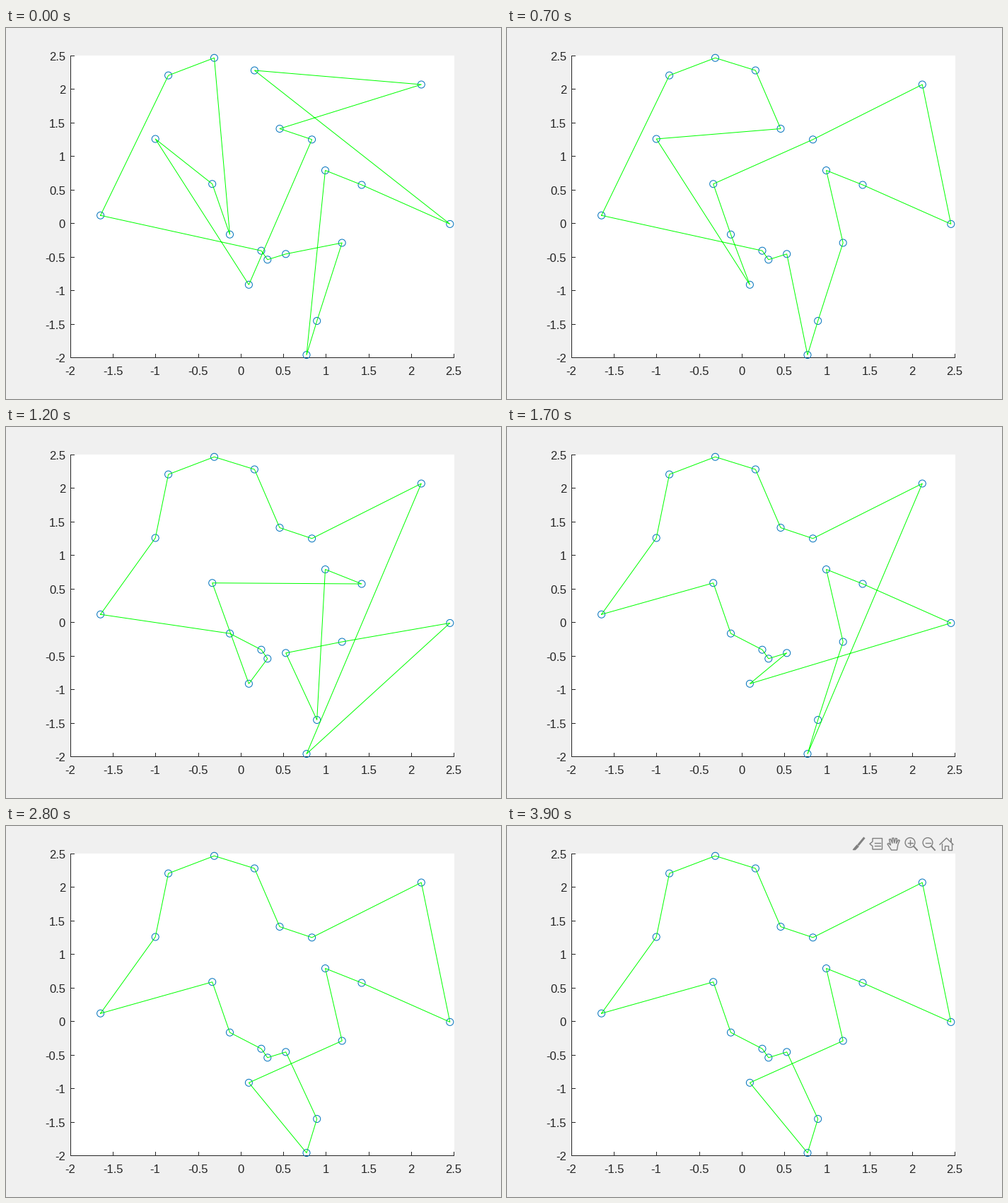
Animation of 700 by 525 pixels, one loop 4 s. Source, as a matplotlib script:

```python
from math import cos, floor, radians, sin

import matplotlib.pyplot as plt
from matplotlib.animation import FuncAnimation
from matplotlib.patches import Circle, Polygon, Rectangle

W, H, DPI = 700, 525, 100
STEP_MS, STEPS = 100, 40
PX = 72 / DPI                       # one pixel in points
INK, ICON = "#262626", "#808080"
LEFT, RIGHT, TOP, BOTTOM = 91.5, 633.5, 39.5, 466.5

# Cities A to T in stage pixels
CITIES = dict(zip("ABCDEFGHIJKLMNOPQRST", [
    (133.6, 265.2), (229.6, 67.1), (294.5, 42.3), (351.4, 60), (387, 142.5),
    (432.6, 157.8), (587.3, 80), (627.8, 277.4), (503, 222), (451.5, 201.5),
    (475.2, 304), (439.7, 414.5), (425, 462.6), (395.7, 319.8), (369.8, 327.8),
    (361, 315.2), (316.5, 292.2), (343.4, 363.3), (291.7, 220.7), (211.2, 157),
]))

# Tours reached at a time in ms, and the times of single-city moves between
CROSSED, SOLVED = "ATBCDEFGHKMLNJISQPOR", "ATBCDEFGHIJKRMLNOPQS"
TOURS = {
    0: "ABCQSTRFEGDHIJMLKNOP",
    400: "ABCTRQSEFGDHIJKLMNOP",
    1000: "ABCDEFGHKNLMJISTROPQ",
    1700: "ATBCDEFGMLKJIHRNOPQS",
    2000: CROSSED,
    2800: SOLVED,
    3600: CROSSED,
    3800: SOLVED,
}
MOVES = (200, 300, 500, 700, 900, 1100, 1200, 1800)

# The toolbar pops up, holds, then fades: (start, hold) in ms
POPUPS = ((2400, 0), (3400, 100), (3900, 0))
FADE = 200

fig = plt.figure(figsize=(W / DPI, H / DPI), dpi=DPI, facecolor="#f0f0f0")
ax = fig.add_axes([0, 0, 1, 1])
ax.set_xlim(0, W)
ax.set_ylim(H, 0)
ax.axis("off")


def line(points, color, width=1.0, **kw):
    xs, ys = zip(*points)
    artist, = ax.plot(xs, ys, color=color, lw=width * PX,
                      solid_joinstyle="round", **kw)
    return artist


def draw_axes():
    ax.add_patch(Rectangle((91, 39), 543, 428, fc="white", ec="none", zorder=0))
    rule = dict(solid_capstyle="butt", snap=False, zorder=1)
    text = dict(color=INK, family="Liberation Sans", size=16.67 * PX)
    line([(91, BOTTOM), (634, BOTTOM)], INK, **rule)
    line([(LEFT, 39), (LEFT, 467)], INK, **rule)
    for i in range(10):
        label = f"{-2 + i / 2:g}"
        x = floor(LEFT + i * (RIGHT - LEFT) / 9) + 0.5
        y = floor(BOTTOM - i * (BOTTOM - TOP) / 9) + 0.5
        line([(x, BOTTOM), (x, BOTTOM - 5.5)], INK, **rule)
        line([(LEFT, y), (LEFT + 5.5, y)], INK, **rule)
        ax.text(x - 0.5, 491, label, ha="center", va="baseline", **text)
        ax.text(84, y + 6.5, label, ha="right", va="baseline", **text)


def draw_toolbar():
    parts = []

    def stroke(points, width=1.4):
        parts.append(line(points, ICON, width, zorder=5))

    def add(patch):
        patch.set(lw=1.4 * PX, ec=ICON, joinstyle="round", zorder=5)
        parts.append(ax.add_patch(patch))

    def brush(x, y):
        stroke([(x + 7, y - 7.5), (x, y + 1)], 3)
        add(Polygon([(x - 2.5, y + 2), (x - 0.5, y + 4), (x - 5, y + 8.5),
                     (x - 8, y + 8.5)], fc=ICON))

    def data_tip(x, y):
        add(Polygon([(x - 5, y - 7.5), (x + 8.5, y - 7.5), (x + 8.5, y + 8),
                     (x - 5, y + 8), (x - 5, y + 3.5), (x - 9, y + 0.3),
                     (x - 5, y - 3)], fill=False))
        for dy in (-1.5, 2.5):
            stroke([(x - 2, y + dy), (x + 6, y + dy)])

    def hand(x, y):
        def polar(angle, r):
            a = radians(angle)
            return x + r * sin(a), y + 9 - r * cos(a)

        outline = [(x - 3.5, y + 9), (x - 9, y + 0.5), (x - 7.5, y - 0.7),
                   (x - 4.5, y + 2)]
        for i in range(4):
            angle, reach = -20 + 16 * i, 17 - 0.4 * (i - 1.3) ** 2
            outline += [polar(angle - 3.5, reach), polar(angle + 3.5, reach),
                        polar(angle + 8, 10)]
        add(Polygon(outline + [(x + 4.5, y + 9)], fill=False))

    def lens(x, y, plus):
        add(Circle((x, y), 6.9, fill=False))
        stroke([(x + 5, y + 5), (x + 10, y + 10.5)], 1.9)
        stroke([(x - 3.5, y), (x + 3.5, y)])
        if plus:
            stroke([(x, y - 3.5), (x, y + 3.5)])

    def home(x, y):
        stroke([(x - 9.5, y + 1.2), (x, y - 8), (x + 9.5, y + 1.2)])
        stroke([(x + 6, y - 3), (x + 6, y - 7.5)], 1.8)
        wall = [(7, 0), (7, 9), (2.5, 9), (2.5, 3)]
        stroke([(x - dx, y + dy) for dx, dy in wall]
               + [(x + dx, y + dy) for dx, dy in wall[::-1]])

    brush(497.5, 25)
    data_tip(522, 25)
    hand(547, 25)
    lens(570, 23.5, True)
    lens(595, 23.5, False)
    home(621.5, 25)
    return parts


def move_city(tour, goal):
    """Move the first misplaced city to its place in the goal tour."""
    i = next(k for k in range(len(goal)) if tour[k] != goal[k])
    city = goal[i]
    return tour[:i] + city + tour[i:].replace(city, "")


def tour_at(ms):
    last = max(t for t in TOURS if t <= ms)
    tour = TOURS[last]
    for t in MOVES:
        if last < t <= ms:
            goal = TOURS[min(k for k in TOURS if k > last)]
            tour = move_city(tour, goal)
    return tour


def toolbar_opacity(ms):
    fades = [1 - max(0, ms - start - hold) / FADE
             for start, hold in POPUPS if ms >= start]
    return max(0, fades[-1]) if fades else 0


draw_axes()
icons = draw_toolbar()
for spot in CITIES.values():
    ax.add_patch(Circle(spot, 5, fill=False, ec="#0072bd", lw=PX, zorder=2))
route = line([CITIES["A"]] * 2, "#00ff00", zorder=3)


def update(step):
    ms = step * STEP_MS
    tour = tour_at(ms)
    route.set_data(*zip(*(CITIES[c] for c in tour + tour[0])))
    opacity = toolbar_opacity(ms)
    for part in icons:
        part.set_alpha(opacity)
        part.set_visible(opacity > 0)
    return [route, *icons]


anim = FuncAnimation(fig, update, frames=STEPS, interval=STEP_MS,
                     init_func=lambda: update(0), repeat=True, repeat_delay=0)
plt.show()
```
